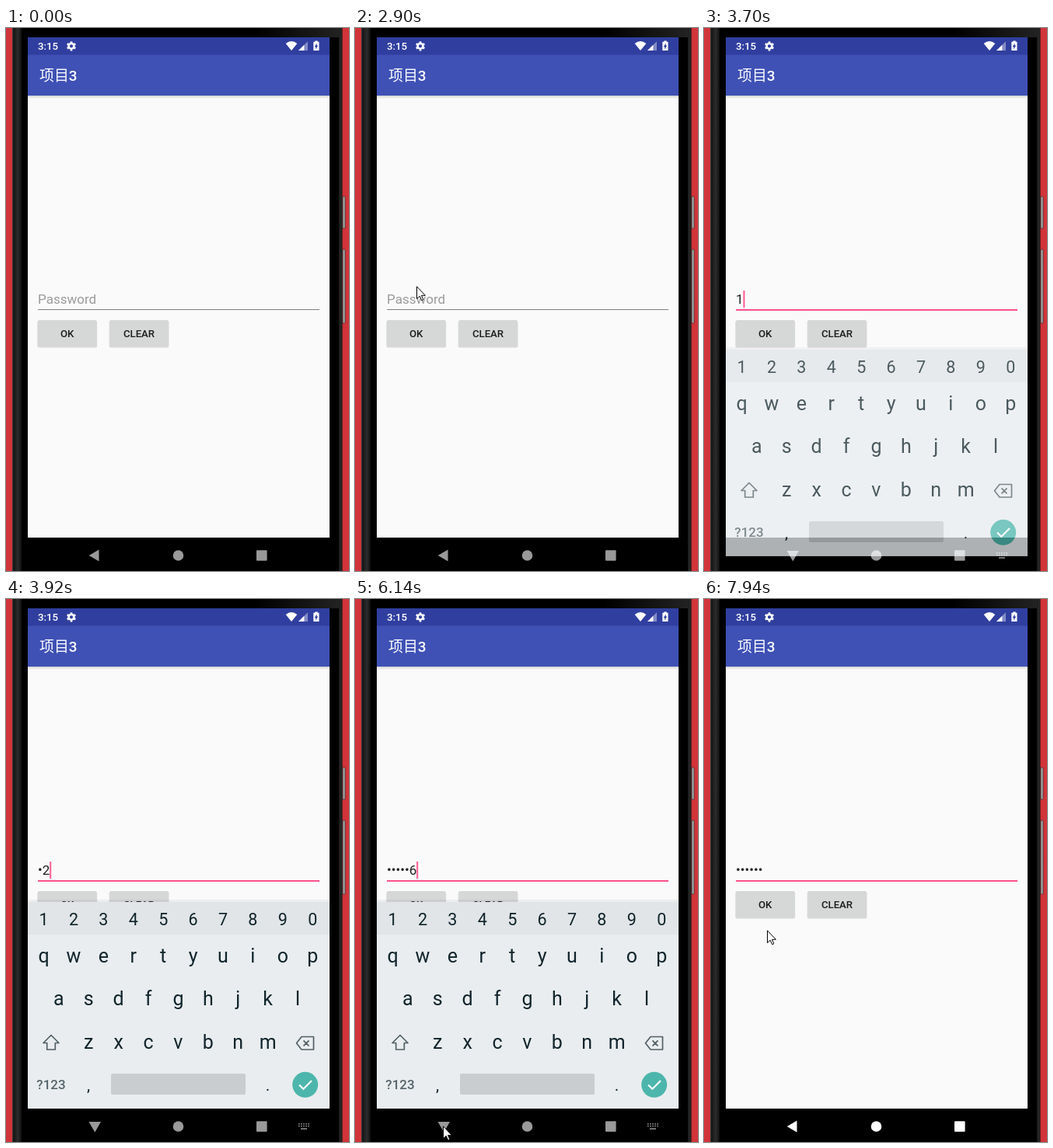
An HTML page for the animation above (8000 ms loop, 441 px wide and 699 px high).

```html
<!DOCTYPE html>
<html lang="zh">
<head>
<meta charset="utf-8">
<title>Password form</title>
<style>
  html, body { margin: 0; width: 100%; height: 100%; overflow: hidden; background: #000; }
  svg { display: block; width: 441px; height: 699px; }
  text { font-family: Roboto, "Noto Sans CJK SC", "Noto Sans CJK", sans-serif; white-space: pre; }
  .med { font-weight: 500; }
  .mid { text-anchor: middle; }
</style>
</head>
<body>
<svg viewBox="0 0 441 699">
  <defs>
    <linearGradient id="edge">
      <stop stop-color="#4a4a4a"/><stop offset=".14" stop-color="#151515"/>
      <stop offset=".6" stop-color="#2c2c2c"/><stop offset="1" stop-color="#101010"/>
    </linearGradient>
    <linearGradient id="gloss">
      <stop/><stop offset="1" stop-color="#222"/>
    </linearGradient>
    <linearGradient id="shade" x2="0" y2="1">
      <stop stop-opacity=".16"/><stop offset="1" stop-opacity="0"/>
    </linearGradient>
  </defs>

  <!-- phone body -->
  <rect width="441" height="699" fill="#d13439"/>
  <rect x="8" width="12" height="699" fill="url(#edge)"/>
  <rect x="20" width="408" height="699"/>
  <rect x="320" width="108" height="12" fill="url(#gloss)"/>
  <rect x="428" width="4.5" height="699" fill="url(#edge)"/>
  <g fill="#aaa" stroke="#333" stroke-width=".8">
    <rect x="433" y="217" width="3" height="41" rx="1"/>
    <rect x="433" y="285" width="3" height="95" rx="1"/>
  </g>

  <!-- app -->
  <rect x="28" y="87" width="388" height="569" fill="#fafafa"/>
  <rect x="28" y="12" width="388" height="23" fill="#303f9f"/>
  <rect x="28" y="34.5" width="388" height="52.5" fill="#3f51b5"/>
  <rect x="28" y="87" width="388" height="4" fill="url(#shade)"/>
  <text class="med" x="43" y="68" font-size="18.9" fill="#fff">项目3</text>

  <!-- status bar -->
  <g fill="#fff">
    <text class="med" x="41" y="28" font-size="13.2">3:15</text>
    <g fill="none" stroke="#fff">
      <circle cx="84" cy="23.3" r="3.4" stroke-width="2.6"/>
      <circle cx="84" cy="23.3" r="5.1" stroke-width="2" pathLength="12" stroke-dasharray="1 1" stroke-dashoffset="-.5"/>
    </g>
    <path d="M367 29L359.7 20Q367 14 374.3 20Z"/>
    <path d="M388 17.2V29H376Z" opacity=".4"/>
    <path d="M383.4 21.7V29H376Z"/>
    <path d="M397.3 17.8V16.5H400.7V17.8H402.5V29H395.3V17.8Z"/>
    <path d="M399.6 19.5V22.6H401.2L398.3 27.4V24.2H396.7Z" fill="#303f9f"/>
  </g>

  <!-- form -->
  <rect id="line" x="41" y="362" width="362" height="1" fill="#7f7f7f"/>
  <rect id="focus" x="41" y="362" width="362" height="1.8" fill="#ff4081"/>
  <text id="hint" x="41" y="355" font-size="17" fill="#9b9b9b">Password</text>
  <g id="entry" font-size="17" fill="#212121"></g>
  <rect id="caret" y="338" width="1.7" height="22" fill="#ff4081"/>
  <g id="buttons" font-size="13.2"></g>

  <!-- keyboard -->
  <g id="keys" fill="#10242b">
    <rect x="28" y="387" width="388" height="3" fill="#000" opacity=".05"/>
    <rect x="28" y="390" width="388" height="266" fill="#e9edef"/>
    <rect x="28" y="390" width="388" height="42" fill="#e1e5e7"/>
    <rect x="135" y="611" width="173" height="27" rx="2" fill="#c9cdcf"/>
    <g fill="none" stroke="#536066" stroke-width="1.7" stroke-linejoin="round">
      <path d="M58 561.5L68 571.5H63.3V580H52.7V571.5H48Z"/>
      <path d="M380 563.5H395.5V580H380L373.5 571.7ZM382.5 568.3L389.5 575.3M389.5 568.3L382.5 575.3"/>
    </g>
    <text class="med mid" x="58" y="631" font-size="17" fill="#56646a">?123</text>
    <text class="mid" x="106" y="632.5" font-size="21">,</text>
    <text class="mid" x="336.5" y="632.5" font-size="21">.</text>
    <circle cx="384.7" cy="625.3" r="16.5" fill="#4db6ac"/>
    <path d="M377 625.5L382.3 630.8L393 620" fill="none" stroke="#fff" stroke-width="2.1"/>
  </g>

  <!-- navigation bar -->
  <rect id="ripple" x="66" y="655" width="96" height="48" rx="24" fill="#fff"/>
  <g id="nav" fill="#fff">
    <path id="back" d="M106.7 679L119.5 671.5V686.5Z"/>
    <path id="down" d="M106.5 673H122L114.3 686.5Z"/>
    <circle cx="221.5" cy="679" r="6.8"/>
    <rect x="322" y="672.2" width="13.6" height="13.6" rx="1"/>
    <g id="imeIcon" fill="none" stroke="#fff" stroke-width="1.5">
      <path d="M376 675.8H390M376 678.6H390" stroke-dasharray="1.6 1.5"/>
      <path d="M379 682H387"/>
    </g>
  </g>

  <path id="cursor" d="M.5 .8V16.6L4.2 13.2L6.7 18.7L8.8 17.8L6.5 12.3H11.4Z" fill="#fff" stroke="#000"/>
</svg>

<script>
const LOOP = 8000, FOCUS = 3080, MASK = 7040;
const KEYS = 6, FIRST_KEY = 3680, KEY_GAP = 225;
const KB_IN = 3520, KB_OUT = 6440, PRESS = 6240;

const $ = id => document.getElementById(id);
const clamp = (v, lo, hi) => Math.min(hi, Math.max(lo, v));
const ramp = (t, from, to) => clamp((t - from) / (to - from), 0, 1);
const within = (t, from, to) => t >= from && t < to;

function add(parent, tag, attrs, text = '') {
  const el = document.createElementNS('http://www.w3.org/2000/svg', tag);
  for (const k in attrs) el.setAttribute(k, attrs[k]);
  el.textContent = text;
  return parent.appendChild(el);
}

// The picture steps every 100 ms, finer while the keyboard is in use
const ticks = [];
for (let t = 0; t < LOOP; t += within(t, 2900, 5840) ? 20 : 100) ticks.push(t);
ticks.push(LOOP);

// pose(t) gives opacity and, if the part moves, x and y
function track(el, pose) {
  const frames = ticks.map(t => {
    const { opacity, x = 0, y = 0 } = pose(t);
    return { offset: t / LOOP, easing: 'step-end', opacity, transform: `translate(${x}px, ${y}px)` };
  });
  el.animate(frames, { duration: LOOP, iterations: Infinity });
}
const show = (el, test) => track(el, t => ({ opacity: +test(t) }));

// buttons
['OK', 'CLEAR'].forEach((label, i) => {
  const x = 41 + i * 92.3, box = $('buttons');
  add(box, 'rect', { x: x - .7, y: 376.5, width: 76.9, height: 35, rx: 2.5, opacity: .13 });
  add(box, 'rect', { x, y: 376, width: 75.5, height: 34, rx: 2, fill: '#d6d7d7' });
  add(box, 'text', { class: 'med mid', x: x + 37.7, y: 398.4, fill: '#1c1c1c' }, label);
});

// key rows, each centred on the keyboard
['1234567890', 'qwertyuiop', 'asdfghjkl', 'zxcvbnm'].forEach((row, r) =>
  [...row].forEach((key, i) => add($('keys'), 'text', {
    class: 'mid',
    x: 221.4 + (i - (row.length - 1) / 2) * 38.4,
    y: r ? 412 + r * 55.5 : 420,
    'font-size': r ? 25 : 21.5
  }, key)));

// typing: the newest digit stays readable, the others are dots
const typed = t => clamp(Math.floor((t - FIRST_KEY) / KEY_GAP) + 1, 0, KEYS) + (t >= MASK);
const caretX = [41];
for (let n = 1; n <= KEYS + 1; n++) {
  const el = add($('entry'), 'text', { x: 41, y: 355 });
  add(el, 'tspan', { dy: -1.3 }, '•'.repeat(n - 1));
  if (n <= KEYS) add(el, 'tspan', { dy: n > 1 ? 1.3 : 0 }, n);
  caretX.push(41 + el.getComputedTextLength());
  show(el, t => typed(t) === n);
}
show($('hint'), t => typed(t) === 0);
show($('line'), t => t < FOCUS);
show($('focus'), t => t >= FOCUS);
track($('caret'), t => ({
  opacity: +(within(t, FOCUS, 4920) || within(t, 5540, MASK)),
  x: caretX[typed(t)]
}));

// keyboard fades while it slides
track($('keys'), t => {
  const opacity = ramp(t, KB_IN, KB_IN + 240) - ramp(t, KB_OUT, KB_OUT + 170);
  return { opacity, y: 38 * Math.cbrt(1 - opacity) };
});

// navigation icons
const open = t => within(t, KB_IN, KB_OUT);
show($('down'), open);
show($('imeIcon'), open);
show($('back'), t => !open(t));
track($('nav'), t => ({ opacity: t < PRESS ? .6 : 1 }));
track($('ripple'), t => ({ opacity: t < PRESS ? 0 : .15 * (1 - ramp(t, PRESS, PRESS + 500)) }));

// pointer: key points of time, x, y
const WAY = [
  [100, 245, 688], [600, 150, 550], [900, 131, 476], [1300, 127, 424], [1800, 107, 380],
  [2700, 85, 338], [2900, 79, 332], [3480, 79, 332],
  [4840, 432, 672], [4910, 400, 699], [5090, 127, 697.5], [5840, 113, 678],
  [PRESS, 113, 678], [6540, 140, 532], [6740, 131, 489], [7840, 81, 426], [LOOP + 1, 81, 426]
];
track($('cursor'), t => {
  const i = WAY.findIndex(p => p[0] > t);
  if (i < 1 || within(t, 3480, 4840)) return { opacity: 0 };
  const [t0, x0, y0] = WAY[i - 1], [t1, x1, y1] = WAY[i];
  const k = ramp(t, t0, t1);
  return { opacity: 1, x: x0 + (x1 - x0) * k, y: y0 + (y1 - y0) * k };
});
</script>
</body>
</html>
```
